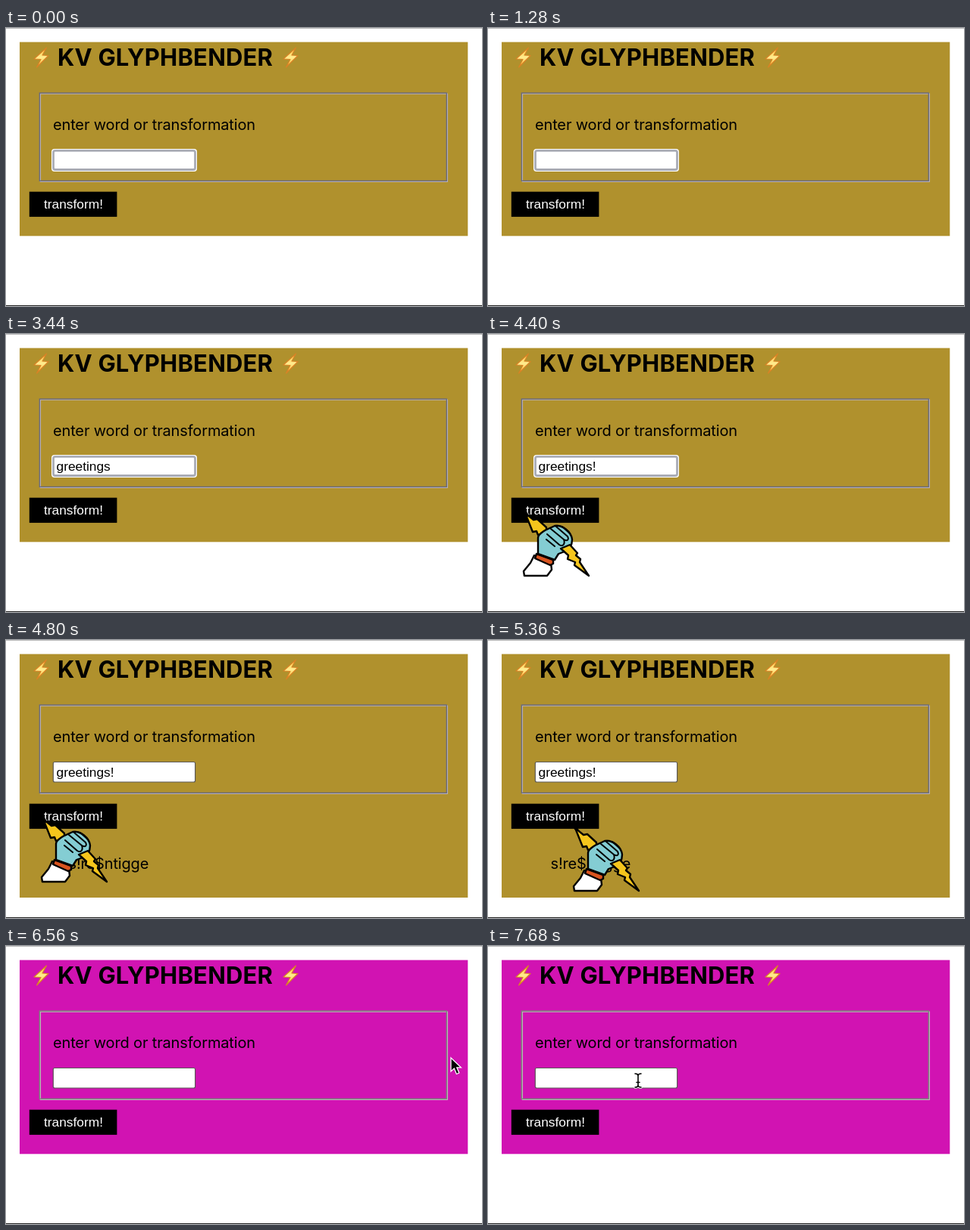
Animation, 628 px wide and 368 px high, one loop 8 s. Source, as an HTML page:

```html
<!DOCTYPE html>
<html lang="en">
<head>
<meta charset="utf-8">
<title>Word form</title>
<style>
  html, body { margin: 0; width: 628px; height: 368px; overflow: hidden; background: #fff; }
  svg { display: block; }
  text { white-space: pre; }
  .ui { font: 20px Inter, "Open Sans", sans-serif; letter-spacing: -.15px; }
  .title { font: 700 31px Inter, "Open Sans", sans-serif; letter-spacing: .2px; }
  .field { font: 17.33px "Liberation Sans", Arial, sans-serif; }
  .line { fill: none; stroke: #000; stroke-width: 2; stroke-linejoin: round; stroke-linecap: round; }
  .ink { stroke: #000; stroke-width: 2.4; stroke-linejoin: round; }
</style>
</head>
<body>
<svg width="628" height="368" viewBox="0 0 628 368">
  <defs>
    <linearGradient id="glow" x2="0" y2="1">
      <stop offset="0" stop-color="#ffcb3c"/>
      <stop offset=".5" stop-color="#ffec90"/>
      <stop offset="1" stop-color="#ffb92a"/>
    </linearGradient>
    <path id="bolt" d="M53.5 26 37 41 46 41.5 40.5 52 56 36.5 48 36Z"
          fill="url(#glow)" stroke="#d98226" stroke-width="1.2" stroke-linejoin="round"/>
  </defs>

  <rect width="628" height="1" fill="#bcbcbc"/>
  <rect y="367" width="628" height="1" fill="#222"/>
  <rect id="panel" x="18" y="18.6" width="591.3"/>

  <use href="#bolt"/>
  <text class="title" x="68" y="50">KV GLYPHBENDER</text>
  <use href="#bolt" x="329"/>

  <g fill="none" stroke-width="1.3">
    <rect id="inner" x="45.4" y="87.1" width="537" height="116.3"/>
    <rect id="outer" x="44.3" y="86" width="537" height="116.3"/>
  </g>
  <text class="ui" x="62" y="135.3">enter word or transformation</text>

  <g id="focused">
    <rect x="60" y="160" width="192" height="30" rx="4" fill="#fff"/>
    <rect x="62.5" y="162.3" width="187" height="25.2" rx="2.5" fill="#fff" stroke="#a9acb6" stroke-width="2.8"/>
  </g>
  <rect id="blurred" x="62.3" y="161.5" width="187.3" height="26.5" rx="2" fill="#fff" stroke="#5c5a58" stroke-width="1.2"/>
  <text id="typed" class="field" x="66.5" y="180.5"></text>
  <rect id="caret" y="165.5" width="1.4" height="19"/>

  <rect x="30.8" y="216.7" width="115.6" height="33.2"/>
  <text class="field" x="50" y="239" fill="#fff">transform!</text>
  <text id="result" class="ui" x="82.5" y="303">s!re$ntigge</text>

  <!-- each pointer is drawn with its hot spot at 0,0 -->
  <g id="hand">
    <path d="M1-5 4 7 11 9Z"/>
    <g class="ink">
      <path d="M5 5 16 14 21 13 33 24 33 32 22 34 20 29 15 30Z" fill="#f5c51c"/>
      <path d="M17 61 12 71 3 82 4 88H34L40 80 39 71Z" fill="#fff"/>
      <path d="M20 59 42 67 42 72 38 74 18 65Z" fill="#d9541f"/>
      <path d="M22 59V38C22 33 27 31 31 28L44 22C54 20 66 30 67 40 67 48 64 53 57 56L49 59 44 67Z" fill="#84cdd3"/>
      <path d="M52 52 64 47 74 58 72 61 78 66 77 70 89 88 70 74 71 70 61 66 62 61Z" fill="#f5c51c"/>
    </g>
    <path class="line" d="M39 26 56 40M46 23 61 36M54 23 64 32M34 33 50 47C55 50 58 46 56 40C61 43 63 40 61 36M33 40 44 49"/>
  </g>
  <path id="arrow" d="M0 0V18L4.3 14 7.4 21.5 10.8 20 7.8 12.8H13.3Z" stroke="#fff" stroke-width="1.3"/>
  <g id="beam" fill="none" stroke-linecap="round">
    <path d="M-4-9Q0-9 0-6Q0-9 4-9M0-6V6M-4 9Q0 9 0 6Q0 9 4 9M-2 2.5H2" stroke="#fff" stroke-width="3.4"/>
    <path d="M-4-9Q0-9 0-6Q0-9 4-9M0-6V6M-4 9Q0 9 0 6Q0 9 4 9M-2 2.5H2" stroke="#000" stroke-width="1.6"/>
  </g>
</svg>
<script>
const LOOP = 8000, STEP = 80, BLINK = 480;
const CLICK = 4720, RESET = 6560;
const WORD = "greetings!";
// first entry is the caret's first blink, the rest are key presses
const keys = [560, 1360, 1600, 1920, 2160, 2320, 2400, 2560, 2720, 2960, 3600];
// time, x, y
const path = [
  [4000, 88, 352], [4320, 50, 241], [4400, 44, 232], [4800, 44, 232],
  [5040, 60, 236], [5360, 110, 244], [5520, 140, 240], [5680, 432, 168],
  [5760, 560, 150], [5840, 587, 148], [6640, 587, 148], [7360, 196, 187], [7680, 198, 178]
];
const el = id => document.getElementById(id);
const show = (id, on) => el(id).setAttribute("visibility", on ? "visible" : "hidden");
const set = (id, name, value) => el(id).setAttribute(name, value);

function pointerAt(t) {
  const i = path.findIndex(p => p[0] > t);
  if (i < 0) return path[path.length - 1].slice(1);
  const [t0, x0, y0] = path[i - 1], [t1, x1, y1] = path[i];
  const k = (t - t0) / (t1 - t0);
  return [x0 + (x1 - x0) * k, y0 + (y1 - y0) * k];
}

function drawPointer(t) {
  let kind = "";
  if (t >= path[0][0]) {
    const [x, y] = pointerAt(t);
    const inside = (l, r, top, bottom) => x > l && x < r && y > top && y < bottom;
    kind = inside(31, 147, 217, 250) ? "hand" : inside(62, 250, 161, 188) ? "beam" : "arrow";
    set(kind, "transform", `translate(${x} ${y})`);
  }
  for (const id of ["hand", "arrow", "beam"]) show(id, id === kind);
}

function draw(t) {
  const fresh = t >= RESET, open = t >= CLICK && !fresh, focus = t < CLICK;
  set("panel", "height", open ? 322.4 : 256.7);
  set("panel", "fill", fresh ? "#d113b2" : "#b0912d");
  set("outer", "stroke", fresh ? "#768a78" : "#666980");
  set("inner", "stroke", fresh ? "#c0b4bc" : "#b8b0b6");
  show("result", open);
  show("focused", focus);
  show("blurred", !focus);

  const pressed = keys.filter(k => k <= t);
  el("typed").textContent = fresh ? "" : WORD.slice(0, Math.max(0, pressed.length - 1));
  const since = t - pressed[pressed.length - 1];
  show("caret", focus && Math.floor(since / BLINK) % 2 === 0);
  set("caret", "x", 66.3 + el("typed").getComputedTextLength());
  drawPointer(t);
}

const start = performance.now();
function frame() {
  const t = (performance.now() - start) % LOOP;
  draw(Math.floor(t / STEP) * STEP);
  requestAnimationFrame(frame);
}
frame();
</script>
</body>
</html>
```
